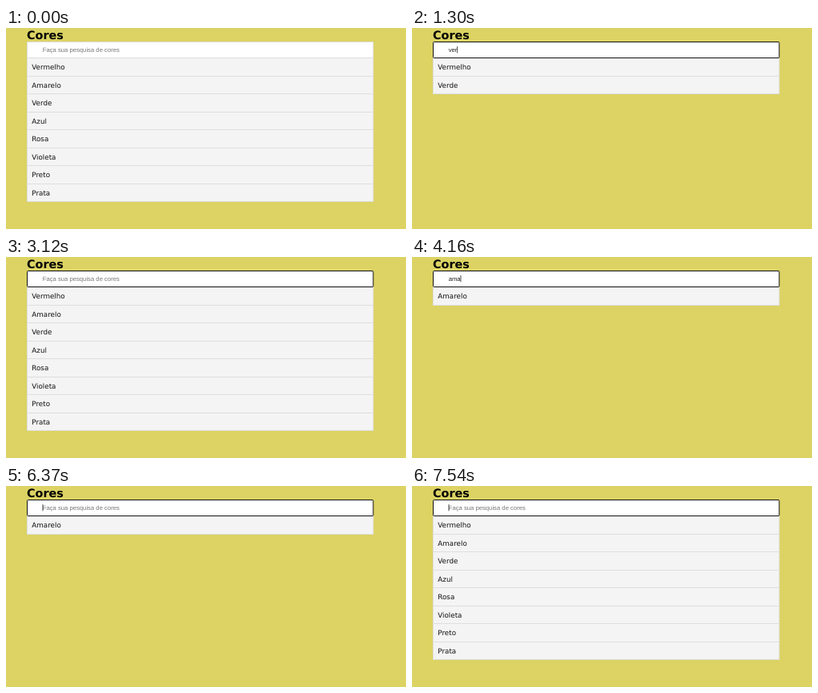
An HTML page for the animation above (8 s loop, 500 px wide and 252 px high).

```html
<!DOCTYPE html>
<html lang="pt">
<head>
<meta charset="utf-8">
<title>Cores</title>
<style>
  html, body { margin: 0; width: 100%; height: 100%; overflow: hidden; background: #dcd364; }
  svg { display: block; }
  text { font-family: "DejaVu Sans", sans-serif; font-size: 8.75px; fill: #111; text-rendering: geometricPrecision; }
  #title { font-size: 14.4px; font-weight: bold; fill: #000; }
  #value { font-family: "Liberation Sans", Arial, sans-serif; font-size: 7.7px; }
</style>
</head>
<body>
<svg width="500" height="252" viewBox="0 0 500 252">
  <text id="title" x="26" y="14">Cores</text>
  <g id="list"></g>
  <rect id="field" x="26.5" y="17.5" width="432.5" height="20" rx="1" fill="#fff"/>
  <text id="value" x="45.7" y="29.8"></text>
  <rect id="caret" y="23" width="0.8" height="8.3" fill="#222"/>
</svg>
<script>
const LOOP = 8000, ROW = 22.5, TOP = 37.7;
const colors = ['Vermelho', 'Amarelo', 'Verde', 'Azul', 'Rosa', 'Violeta', 'Preto', 'Prata'];

// start time, typed text, list filter, caret visible
const states = [
  [0, '', '', 0],
  [650, '', '', 1],
  [910, 'v', 'v', 1],
  [1040, 've', 've', 1],
  [1300, 'ver', 'ver', 1],
  [1820, 'ver', 'ver', 0],
  [2340, 'ver', 'ver', 1],
  [2600, 've', 've', 1],
  [2730, 'v', 've', 1],
  [2860, '', 've', 1],
  [3120, '', '', 0],
  [3510, '', '', 1],
  [4030, 'am', 'am', 1],
  [4160, 'ama', 'ama', 1],
  [4810, 'ama', 'ama', 0],
  [5070, 'am', 'am', 1],
  [5200, 'a', 'am', 1],
  [5330, '', 'am', 1],
  [5850, '', 'am', 0],
  [6370, '', 'am', 1],
  [6500, '', '', 1],
  [7020, '', '', 0],
  [7540, '', '', 1]
];

const $ = id => document.getElementById(id);
const edge = i => Math.floor(TOP + i * ROW) + 0.5;

function row(name, i) {
  return `<rect x="26.5" y="${edge(i)}" width="432.5" height="${edge(i + 1) - edge(i)}" fill="#f4f4f4" stroke="#dedede"/>
    <text x="32.3" y="${TOP + i * ROW + 14.5}">${name}</text>`;
}

function render([start, text, filter, caretOn]) {
  const value = $('value'), caret = $('caret');
  $('list').innerHTML = colors.filter(c => c.toLowerCase().startsWith(filter)).map(row).join('');
  $('field').setAttribute('stroke', start > 0 ? '#101014' : '#ddd');
  value.textContent = text || 'Faça sua pesquisa de cores';
  value.style.fill = text ? '#222' : '#777';
  caret.setAttribute('x', 45.6 + (text ? value.getComputedTextLength() : 0));
  caret.setAttribute('visibility', caretOn ? 'visible' : 'hidden');
}

let current;
function tick() {
  const t = performance.now() % LOOP;
  const state = states.findLast(s => s[0] <= t);
  if (state !== current) render(current = state);
  requestAnimationFrame(tick);
}
tick();
</script>
</body>
</html>
```
